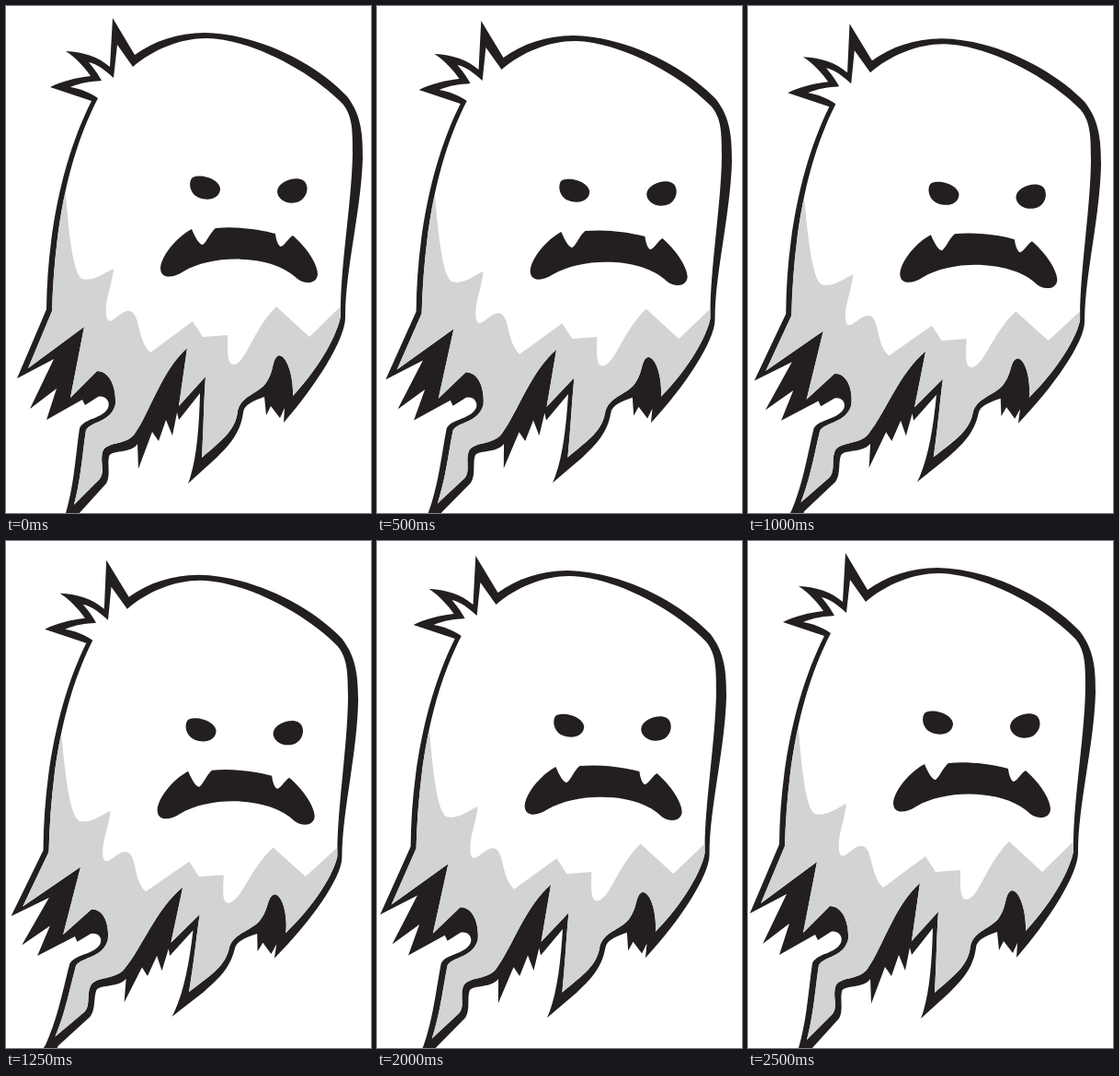
Animation of 397 by 550 pixels, one loop 2750 ms. Source, as an HTML page:

```html
<!DOCTYPE html>
<html lang="en">
<head>
<meta charset="utf-8">
<title>Ghost</title>
<style>
html, body { margin: 0; width: 100%; height: 100%; overflow: hidden; background: #fff; }
svg { display: block; width: 397px; height: 550px; }
.ink { fill: #231f20; }
.cloth { fill: #fff; }
.shade { fill: #d1d3d4; }
</style>
</head>
<body>
<svg viewBox="0 0 397 550">
  <clipPath id="inside"><path data-shape="body"/></clipPath>
  <path class="ink" data-shape="outline"/>
  <path class="cloth" data-shape="body"/>
  <g clip-path="url(#inside)"><path class="shade" data-shape="shade"/></g>
  <path class="ink" data-shape="eyes"/>
  <path class="ink" data-shape="mouth"/>
</svg>
<script>
const shapes = {
  outline: `M116 13 L140 53 C161 38 187 29 216 29 C275 30 338 63 371 98
    C387 119 388 140 388 165 C386 225 369 285 369 337 C370 360 338 411 302 452
    L303 436 L298 447 L288 434 L283 444 L281 424 C270 428 259 432 258 441
    C255 464 242 477 229 490 L198 518 C207 495 210 460 211 420
    L188 449 L186 441 L181 466 L174 449 L166 472 L159 462 L144 502 L143 475
    C136 486 113 481 112 489 C110 497 114 509 109 518 L79 551 L72 572 L58 566
    L65 550 C74 520 76 485 80 458 C85 447 105 448 111 436 C114 428 107 422 100 424
    L86 433 L83 427 L44 449 L55 415 L26 437 L52 383 L12 404 L44 329
    C45 240 64 160 93 103 L48 88 C62 81 76 78 92 76 C85 66 76 56 65 49
    C85 50 100 55 113 66 Z`,
  body: `M121 42 L138 66 C160 47 190 35 218 35 C268 36 333 72 366 106
    C377 119 377 135 377 160 C376 215 363 285 364 336 C361 355 342 391 312 423
    C313 406 307 380 297 379 C289 382 292 395 284 407 C277 420 256 422 252 439
    C250 460 236 470 213 490 C215 456 215 430 217 402 L188 434 L197 371
    C169 396 157 440 140 464 C131 477 108 472 105 484 C102 494 108 505 102 513
    L74 541 C82 510 83 485 87 460 C93 450 114 452 119 432 C120 414 113 396 99 396
    L70 425 L85 348 L24 393 L50 331 C53 235 69 160 100 100
    C90 93 81 90 70 88 C82 83 92 82 104 81 C99 72 95 67 90 61
    C100 63 108 70 117 78 Z`,
  shade: `M65 204 C68 245 73 292 83 296 C97 299 107 289 117 285
    C115 304 107 320 109 336 C112 350 121 334 131 331 C147 328 141 361 157 376
    L203 342 L214 359 L241 357 C241 375 240 389 248 389
    C262 386 268 352 294 326 L330 359 L370 320 L370 580 L0 580 L0 204 Z`,
  eyes: `M203 186 C215 181 234 190 233 199 C232 209 220 212 210 208 C199 204 198 190 203 186 Z
    M323 189 C330 193 329 207 319 212 C307 217 295 210 295 201 C296 190 315 184 323 189 Z`,
  mouth: `M202 242 C207 254 211 259 214 259 C219 255 222 246 228 241
    C250 239 275 242 293 247 C294 256 297 261 299 261 C303 260 306 253 312 249
    C327 262 339 280 339 291 C338 302 325 302 317 296 C290 269 225 269 193 288
    C180 296 168 296 168 284 C169 271 185 251 202 242 Z`
};

const STEP = 250, STEPS = 11, MID = 5;

// Shift at the middle of the loop: head dips, hem trails to the left.
function sway(y) {
  const low = Math.max(0, y - 300);
  return [-7 + 3.8 * Math.min(y, 300) / 300 - 0.0003 * low * low, 7.7 - 0.045 * low];
}

function warp(d, n) {
  const bend = n <= MID ? n / MID : 2 - n / MID;
  const drift = n <= MID ? 0 : -10 * (n / MID - 1);
  return d.replace(/(\d+) (\d+)/g, (_, x, y) => {
    const [dx, dy] = sway(+y);
    return (+x + dx * bend + drift).toFixed(2) + ' ' + (+y + dy * bend).toFixed(2);
  });
}

const paths = document.querySelectorAll('[data-shape]');
let shown = -1;

function draw() {
  const n = Math.floor(performance.now() / STEP) % STEPS;
  if (n !== shown) {
    shown = n;
    for (const p of paths) p.setAttribute('d', warp(shapes[p.dataset.shape], n));
  }
  requestAnimationFrame(draw);
}
draw();
</script>
</body>
</html>
```
